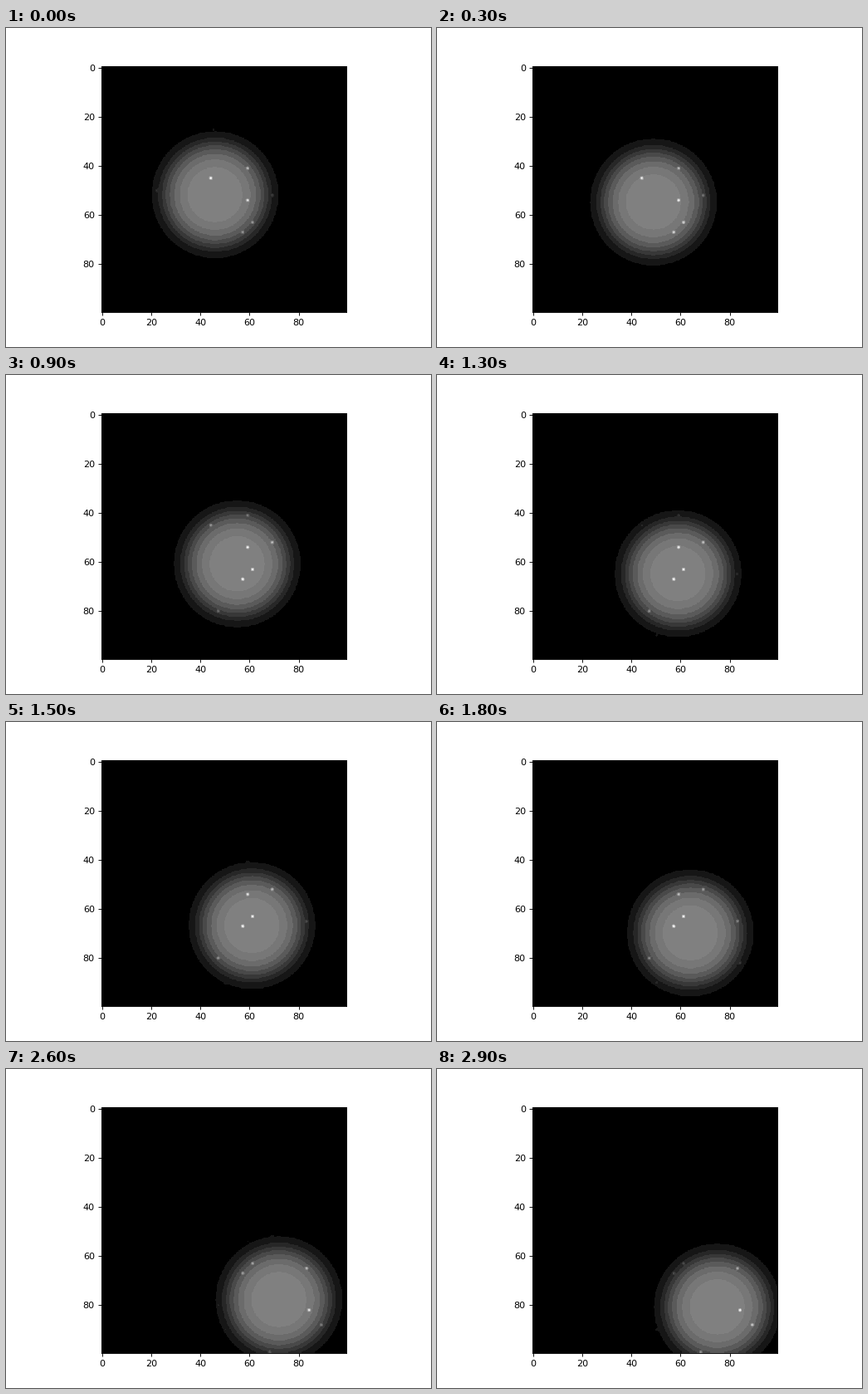
These frames come from a looping animation (512 by 384 pixels, 3 s). A matplotlib script:

```python
import numpy as np
import matplotlib.pyplot as plt
from matplotlib.animation import FuncAnimation
from matplotlib.colors import BoundaryNorm, ListedColormap

SIZE = 100
FRAMES = 30
START = (45.75, 51.75)

# Spotlight: flat-topped bell with soft edge
PEAK, RADIUS, POWER = 128, 21.6, 5.1

STARS = [(44, 45), (59, 54), (59, 41), (61, 63), (57, 67), (22, 50), (69, 52),
         (45, 25), (47, 80), (83, 65), (50, 90), (84, 82), (89, 88), (68, 99)]

# Grey steps: edge of the spotlight, its core, then the stars
LEVELS = np.r_[0, np.arange(22, 108, 17), 119, PEAK, np.linspace(146, 255, 7)]
BOUNDS = np.r_[-1, (LEVELS[1:] + LEVELS[:-1]) / 2, 256]

ys, xs = np.mgrid[:SIZE, :SIZE]
scene = np.ones((SIZE, SIZE))
for sx, sy in STARS:
    scene[sy, sx] = 2


def lit_scene(i):
    """The scene under the spotlight, which moves one cell diagonally per step."""
    r = np.hypot(xs - START[0] - i, ys - START[1] - i)
    return scene * PEAK * np.exp(-(r / RADIUS) ** POWER)


fig, ax = plt.subplots(figsize=(6.4, 4.8), dpi=80)
cmap = ListedColormap([str(v / 255) for v in LEVELS])
norm = BoundaryNorm(BOUNDS, len(LEVELS))
image = ax.imshow(lit_scene(0), cmap=cmap, norm=norm, interpolation="hanning",
                  interpolation_stage="data")


def update(i):
    image.set_data(lit_scene(i))
    return [image]


anim = FuncAnimation(fig, update, frames=FRAMES, interval=100, repeat=True)
plt.show()
```
